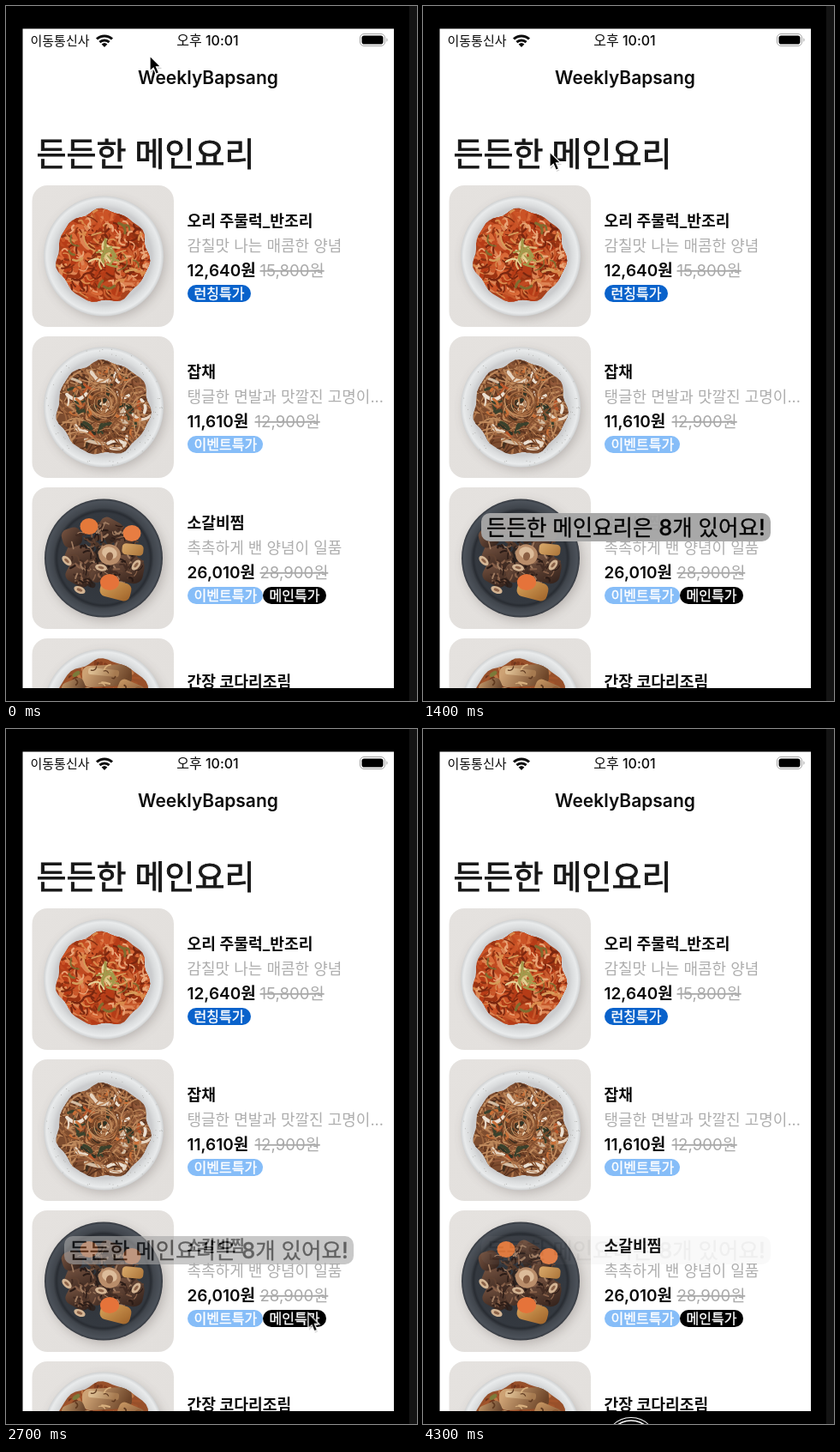
These frames come from a looping animation (480 px wide and 810 px high, 4400 ms). An HTML page with a canvas:

```html
<!DOCTYPE html>
<html lang="ko">
<head>
<meta charset="utf-8">
<style>
  html, body { margin: 0; width: 100%; height: 100%; overflow: hidden; background: #000; }
  canvas, svg { position: absolute; left: 0; top: 0; width: 480px; height: 810px; }
  text { font-family: Inter, "Noto Sans CJK KR", "Noto Sans CJK", sans-serif; font-size: 18px; fill: #0b0b0b; white-space: pre; }
  .status { font-size: 15px; }
  .clock { font-size: 16px; font-weight: 500; text-anchor: middle; }
  .brand { font-size: 21px; font-weight: 600; text-anchor: middle; }
  .heading { font-size: 38px; font-weight: 500; fill: #181818; stroke: #181818; stroke-width: .9px; }
  .name { font-size: 18.2px; font-weight: 600; }
  .price { font-size: 19px; font-weight: 600; }
  .desc { fill: #aeaeae; }
  .old { font-size: 18.6px; fill: #a9a9a9; text-decoration: line-through; }
  .badge { font-size: 16px; fill: #fff; stroke: #fff; stroke-width: .35px; }
  .toast { animation: fade 4.4s linear infinite; }
  .toast text { font-size: 25.5px; font-weight: 500; fill: #000; stroke: #000; stroke-width: .3px; }
  .cursor { animation: move 4.4s linear infinite; }
  .ring { fill: none; animation: press 4.4s step-end infinite; }

  @keyframes fade {
    0%, 22.7% { opacity: 0; }
    22.73% { opacity: 1; }
    31.82% { opacity: .98; }
    43.18% { opacity: .895; }
    52.27% { opacity: .77; }
    61.36% { opacity: .62; }
    81.82% { opacity: .28; }
    97.73% { opacity: .06; }
    100% { opacity: .04; }
  }
  @keyframes move {
    0% { transform: translate(168px, 58px); animation-timing-function: ease-in-out; }
    13.64%, 52.27% { transform: translate(148px, 170px); animation-timing-function: ease-in-out; }
    61.36% { transform: translate(353px, 680px); }
    68.18% { transform: translate(320px, 818px); }
    90%, 100% { transform: translate(243px, 833px); }
  }
  @keyframes press {
    0% { opacity: 0; }
    15.9% { opacity: 1; }
    22.7% { opacity: 0; }
    97.5%, 100% { opacity: 1; }
  }
</style>
</head>
<body>
<canvas id="photos" width="480" height="810"></canvas>
<svg viewBox="0 0 480 810">
  <defs><clipPath id="screen"><rect x="19.5" y="26.5" width="433.5" height="768.5"/></clipPath></defs>
  <g clip-path="url(#screen)">
    <text class="status" x="28.5" y="45.5">이동통신사</text>
    <g fill="none" stroke="#0b0b0b" stroke-width="3">
      <path d="M106 38.5a13.2 13.2 0 0 1 18 0M109.4 42.2a8.4 8.4 0 0 1 11.2 0"/>
      <path d="M115 48l-3.4-3.5a5 5 0 0 1 6.8 0z" fill="#0b0b0b" stroke="none"/>
    </g>
    <text class="clock" x="235.5" y="46">오후 10:01</text>
    <rect x="413.5" y="32.5" width="29" height="14" rx="4.5" fill="none" stroke="#a5a5a5"/>
    <rect x="415.5" y="34.5" width="25" height="10" rx="2.8"/>
    <path d="M444.3 37q2.5 2.5 0 5z" fill="#a5a5a5"/>
    <text class="brand" x="236" y="91">WeeklyBapsang</text>
    <text class="heading" x="35.5" y="186">든든한 메인요리</text>
    <g id="rows"></g>
  </g>
  <g class="toast">
    <rect x="68" y="591" width="338" height="33" rx="10" fill="#a6a6a6"/>
    <text x="74" y="616.5">든든한 메인요리은 8개 있어요!</text>
  </g>
  <g class="cursor">
    <g class="ring">
      <circle r="28.6" stroke="#fff" stroke-width="4.6"/>
      <circle r="28.8" stroke="#000" stroke-width="2.2"/>
    </g>
    <path d="M1 2V20L5 16.4 8 23 11.4 21.5 8.4 15H14Z" fill="#000" opacity=".2"/>
    <path d="M0 0V18L4.2 14.3 7.2 21.3 10.6 19.8 7.6 13H13Z" stroke="#fff" stroke-width="1.3"/>
  </g>
</svg>
<script>
const LAUNCH = ['런칭특가', '#0962cb', 74], EVENT = ['이벤트특가', '#86bdf8', 88], MAIN = ['메인특가', '#000', 74];
const items = [
  ['오리 주물럭_반조리', '감칠맛 나는 매콤한 양념', '12,640원', '15,800원', 296.5, [LAUNCH]],
  ['잡채', '탱글한 면발과 맛깔진 고명이...', '11,610원', '12,900원', 290.5, [EVENT]],
  ['소갈비찜', '촉촉하게 밴 양념이 일품', '26,010원', '28,900원', 296.5, [EVENT, MAIN]]
];
const label = (cls, x, y, s) => `<text class="${cls}" x="${x}" y="${y}">${s}</text>`;

function row([name, desc, price, old, oldX, badges], i) {
  const y = 176 * i;
  let x = 212;
  const pills = badges.map(([s, color, w]) => {
    const pill = `<rect x="${x}" y="${y + 325}" width="${w}" height="20" rx="10" fill="${color}"/>` +
      label('badge', x + 7.5, y + 340.6, s);
    x += w;
    return pill;
  });
  return label('name', 211.5, y + 257, name) + label('desc', 211.5, y + 286, desc) +
    label('price', 211.5, y + 314.8, price) + label('old', oldX, y + 314.8, old) + pills.join('');
}
document.getElementById('rows').innerHTML = items.map(row).join('') + label('name', 211.5, 794, '간장 코다리조림');

const ctx = document.getElementById('photos').getContext('2d');
let seed = 7;
const rnd = () => (seed = seed * 16807 % 2147483647) / 2147483647;
const pick = list => list[Math.floor(rnd() * list.length)];

function oval(x, y, rx, ry, fill, turn = 0) {
  ctx.fillStyle = fill;
  ctx.beginPath();
  ctx.ellipse(x, y, rx, ry, turn, 0, 7);
  ctx.fill();
}
function shade(x, y, r, stops) {
  const g = ctx.createRadialGradient(x, y, 0, x, y, r);
  stops.forEach(([at, color]) => g.addColorStop(at, color));
  oval(x, y, r, r, g);
}
// Fills the food area with a gently uneven edge and keeps later drawing inside it.
function bed(x, y, r, fill) {
  ctx.beginPath();
  for (let a = 0; a < 6.28; a += .1) {
    const d = r + 1.6 * Math.sin(a * 7) + 1.2 * Math.sin(a * 11 + 1);
    ctx.lineTo(x + Math.cos(a) * d, y + Math.sin(a) * d);
  }
  ctx.closePath();
  ctx.fillStyle = fill;
  ctx.fill();
  ctx.clip();
}
// Random curved shreds scattered inside a disc.
function shreds(n, radius, width, length, colors) {
  for (let i = 0; i < n; i++) {
    const a = rnd() * 7, d = Math.sqrt(rnd()) * radius, turn = rnd() * 7, len = length * (.5 + rnd());
    const x = Math.cos(a) * d, y = Math.sin(a) * d;
    const dx = Math.cos(turn) * len / 2, dy = Math.sin(turn) * len / 2, bend = rnd() - .5;
    ctx.strokeStyle = pick(colors);
    ctx.lineWidth = width * (.6 + rnd() * .8);
    ctx.beginPath();
    ctx.moveTo(x - dx, y - dy);
    ctx.quadraticCurveTo(x - dy * bend * 3, y + dx * bend * 3, x + dx, y + dy);
    ctx.stroke();
  }
}
function chunk(x, y, w, h, turn, base, light) {
  ctx.save();
  ctx.translate(x, y);
  ctx.rotate(turn);
  ctx.beginPath();
  ctx.roundRect(-w / 2, -h / 2, w, h, Math.min(w, h) * .35);
  const g = ctx.createLinearGradient(-w / 3, -h / 2, w / 3, h / 2);
  g.addColorStop(0, light);
  g.addColorStop(1, base);
  ctx.fillStyle = g;
  ctx.fill();
  ctx.restore();
}
function whitePlate() {
  shade(0, 0, 70, [[0, '#cfd0d1'], [.8, '#cbccce'], [.86, '#dadcdd'], [.95, '#e9ebec'], [1, '#cfd1d2']]);
}

function spicyDish() {
  whitePlate();
  bed(-1, 0, 53.5, '#a9421d');
  shreds(240, 52, 5.5, 15, ['#b63c17', '#cb5326', '#d96a38', '#9c3312', '#c04a21', '#dd8454']);
  shreds(190, 52, 2, 9, ['#7a260f', '#eaa678', '#d98b4c', '#8a3012', '#c75a2c']);
  shreds(18, 45, 2.2, 14, ['#dfb878', '#7f6c30', '#d59d5b']);
  shreds(13, 15, 2.6, 15, ['#dcc683', '#a39a4c', '#e6d298']);
}
function noodleDish() {
  whitePlate();
  for (let i = 0; i < 60; i++) {
    const a = rnd() * 7, d = 58 + rnd() * 11;
    oval(Math.cos(a) * d, Math.sin(a) * d, .5, .5, '#aaaaa7');
  }
  bed(0, 1, 54, '#7c4c2f');
  shreds(230, 52, 1.7, 30, ['#92593a', '#ad7349', '#6b3b22', '#bd885b', '#9e663f', '#57321f']);
  shreds(26, 46, 3, 14, ['#3a412c', '#43301f', '#2c3325']);
  shreds(16, 46, 3.4, 16, ['#e6d5c2', '#d4bda4', '#ebe0d2']);
  shreds(16, 46, 2.6, 10, ['#b9572b', '#c97038']);
  shreds(60, 50, 1.4, 28, ['#ad7349', '#c08b5e', '#84502f']);
  ctx.lineWidth = 1.3;
  for (let i = 0; i < 14; i++) {
    ctx.strokeStyle = pick(['#a96f44', '#c18c5e', '#7a4829']);
    ctx.beginPath();
    ctx.ellipse(-1, -5, 7 + i * 1.3, 6 + i, i * .4, i, i + 4.5);
    ctx.stroke();
  }
  shreds(10, 6, 1.2, 2, ['#ead9bd']);
}
function beefDish() {
  shade(0, 0, 69, [[0, '#2e3238'], [.76, '#343940'], [.8, '#282c32'], [.85, '#40454c'], [.96, '#4c525a'], [1, '#32363d']]);
  shreds(38, 34, 6, 12, ['#3b2a22', '#2c2320', '#4f372a']);
  const brown = '#35231c', tan = '#73513f';
  [[-27, -1, 36, 25, .4], [8, -34, 29, 22, .5], [-37, -24, 23, 22, -.3], [29, 13, 36, 31, .2],
   [-29, 20, 30, 22, .5], [-4, 16, 26, 23, -.2], [24, -14, 22, 18, -.3]]
    .forEach(([x, y, w, h, turn]) => chunk(x, y, w, h, turn, brown, tan));
  shreds(150, 43, 1.8, 7, ['#5f4131', '#422b22', '#876049', '#2a1b16', '#a17d62']);
  chunk(14, 37, 36, 21, .25, '#a56a2f', '#d6a058');
  chunk(34, -10, 25, 13, .1, '#b07a3e', '#d5a566');
  oval(-17, -37, 10.5, 9.5, '#e4793a');
  oval(33, -29, 10.5, 9.5, '#e77d42');
  oval(7, 28, 11, 9.5, '#e5733a');
  oval(7, -4, 13, 12, '#b98d6a', .3);
  oval(7, -6, 9, 7, '#dcbc9a', .3);
  oval(7, -2, 4, 5, '#8b6044', .3);
  [[-43, 3, .8], [38, 8, -.9], [-3, 11, .2], [-28, 37, .4]].forEach(([x, y, turn]) => {
    oval(x, y, 7, 4, '#d4b594', turn);
    oval(x, y, 3.5, 1.6, '#8c6349', turn);
  });
}
function fishDish() {
  whitePlate();
  bed(0, 0, 57, '#98502a');
  shreds(130, 54, 3.5, 12, ['#a3552c', '#833e1f', '#bd7848', '#6d351c']);
  chunk(4, -39, 58, 25, -.05, '#6d4529', '#cda274');
  chunk(0, -43, 36, 8, .1, '#a67a50', '#dcbd92');
  chunk(-35, -25, 27, 18, -.4, '#64412a', '#b88f63');
  chunk(32, -23, 31, 17, .4, '#7d5031', '#c2925f');
  oval(-32, -41, 5, 2.5, '#7b7a3a', -.6);
  shreds(60, 52, 1.5, 7, ['#d8b07e', '#5f3a20', '#8f5a34']);
}

ctx.fillStyle = '#141414';
ctx.fillRect(471, 0, 9, 810);
ctx.beginPath();
ctx.rect(19.5, 26.5, 433.5, 768.5);
ctx.fillStyle = '#fff';
ctx.fill();
ctx.clip();
ctx.lineCap = 'round';
[spicyDish, noodleDish, beefDish, fishDish].forEach((dish, i) => {
  ctx.save();
  ctx.translate(0, 176 * i);
  const g = ctx.createLinearGradient(30, 209, 196, 374);
  g.addColorStop(0, '#e5e2df');
  g.addColorStop(1, '#e2dfdc');
  ctx.beginPath();
  ctx.roundRect(30.5, 209, 165.5, 165, 18);
  ctx.fillStyle = g;
  ctx.fill();
  ctx.clip();
  ctx.translate(114, 291.5);
  ctx.shadowColor = 'rgba(70,60,55,.3)';
  ctx.shadowBlur = 14;
  ctx.shadowOffsetX = 3;
  ctx.shadowOffsetY = 4;
  oval(0, 0, 68, 68, '#ccc');
  ctx.shadowColor = 'transparent';
  dish();
  ctx.restore();
});
</script>
</body>
</html>
```
